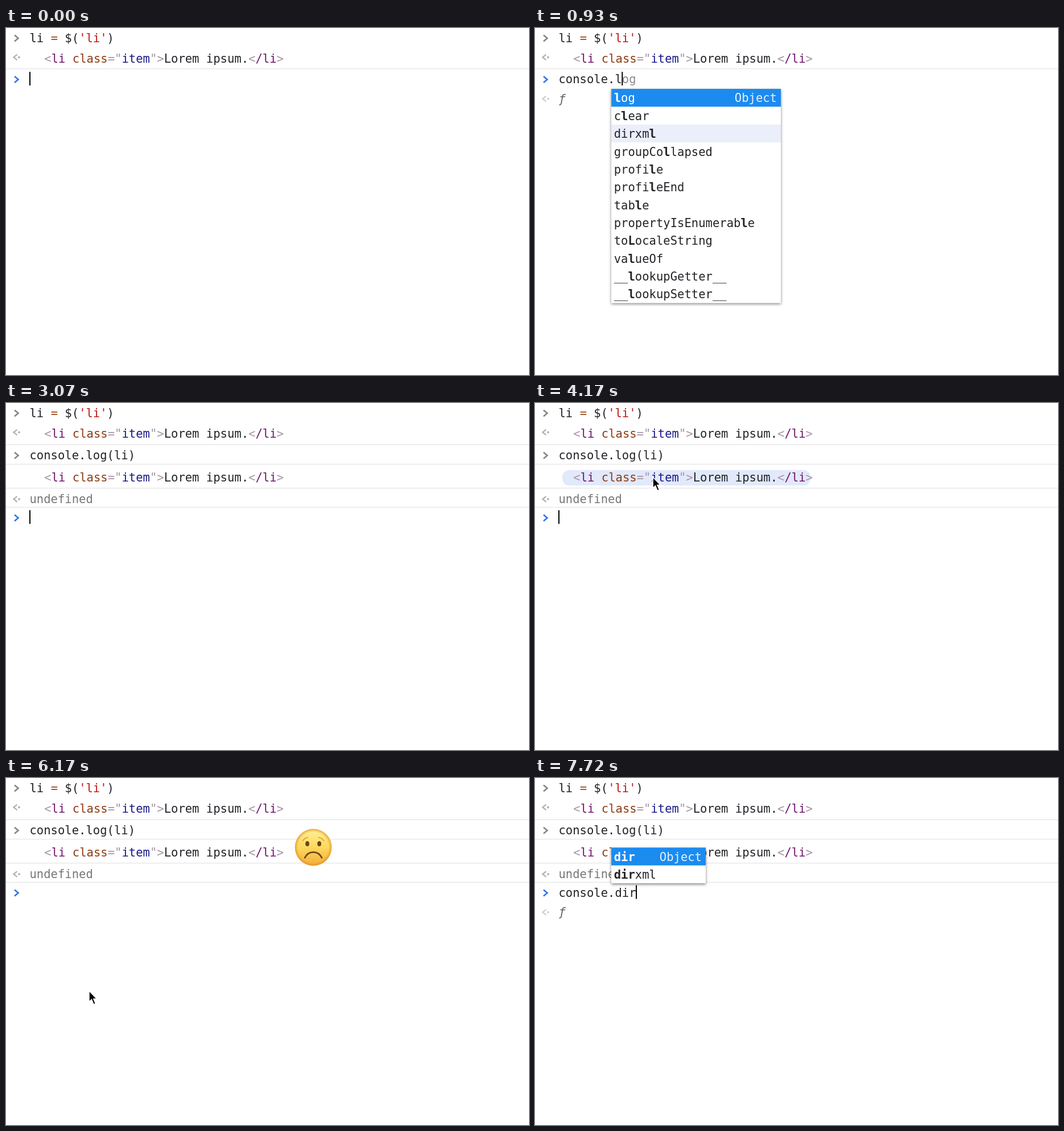
Recreate the animation shown at these times as an HTML page. Size 919x610 px, loop 8000 ms.

```html
<!DOCTYPE html>
<html lang="en">
<head>
<meta charset="utf-8">
<title>Console</title>
<style>
html, body { margin: 0; width: 100%; height: 100%; overflow: hidden; background: #fff; }
svg { display: block; width: 919px; height: 610px; }
text { font: 20.55px "DejaVu Sans Mono", monospace; white-space: pre; }
.b { font-weight: bold; }
.i { font-style: italic; }
</style>
</head>
<body>
<svg viewBox="0 0 919 610">
  <defs>
    <linearGradient id="face" x1="0" y1="0" x2="0" y2="1">
      <stop offset="0" stop-color="#fff09a"/>
      <stop offset=".5" stop-color="#fdd95c"/>
      <stop offset="1" stop-color="#f3ac3a"/>
    </linearGradient>
    <radialGradient id="rim">
      <stop offset=".82" stop-color="#e89a28" stop-opacity="0"/>
      <stop offset="1" stop-color="#dd8f22" stop-opacity=".75"/>
    </radialGradient>
    <filter id="shadow" x="-10%" y="-20%" width="120%" height="150%">
      <feDropShadow dx="0" dy="2" stdDeviation="2.4" flood-color="#000" flood-opacity=".5"/>
    </filter>
  </defs>
  <g id="stage"></g>
</svg>
<script>
const LOOP = 8000, CW = 12.37, LEFT = 41.5, ROW = 31.35;
const INK = '#222428', GRAY = '#7c7c7c', PALE = '#a894a6', TAG = '#70146a', NAME = '#8c3c14';
const SENT = 2210, RETYPE = 6480;

const globals = ('clear console confirm copy length li caches close closed crypto chrome customElements ' +
  'LinearAccelerationSensor AbsoluteOrientationSensor ApplicationCacheErrorEvent PublicKeyCredential ' +
  'cancelAnimationFrame HTMLDivElement clearInterval RelativeOrientationSensor clientInformation ' +
  'DocumentTimeline MediaCapabilities cancelIdleCallback VisualViewport HTMLFieldSetElement ' +
  'HTMLDialogElement applicationCache HTMLLinkElement').split(' ');
const methods = ('assert clear context count countReset debug dir dirxml error group groupCollapsed ' +
  'groupEnd info log profile profileEnd table time timeEnd timeStamp trace warn constructor ' +
  'hasOwnProperty isPrototypeOf propertyIsEnumerable toLocaleString toString valueOf ' +
  '__defineGetter__ __defineSetter__ __lookupGetter__ __lookupSetter__').split(' ');

// time, typed text, right edge of the suggestions (0: none), preview, text after the caret
const steps = [
  [0, ''],
  [70, 'c', 530],
  [280, 'co', 530, 'obj'],
  [330, 'con', 202, 'obj'],
  [410, 'console', 0, 'obj'],
  [590, 'console.', 432],
  [850, 'console.l', 432, 'fn'],
  [970, 'console.lo', 432, 'fn'],
  [1000, 'console.log', 300, 'fn'],
  [1030, 'console.log', 0, 'fn'],
  [1310, 'console.log(', 0, 'hint', ')'],
  [1550, 'console.log(l', 680, '', ')'],
  [1660, 'console.log(li', 580, '', ')'],
  [1970, 'console.log(li)'],
  [SENT, ''],
  [RETYPE, 'c', 530],
  [6600, 'co', 530, 'obj'],
  [6710, 'con', 288, 'obj'],
  [6800, 'cons', 288, 'obj'],
  [6870, 'conso', 288, 'obj'],
  [6970, 'console', 0, 'obj'],
  [7180, 'console.', 432],
  [7430, 'console.d', 432, 'fn'],
  [7560, 'console.di', 300, 'fn'],
  [7660, 'console.dir', 300, 'fn']
];

const esc = s => s.replace(/&/g, '&amp;').replace(/</g, '&lt;');
const span = (s, fill, cls = '') => `<tspan fill="${fill}" class="${cls}">${esc(s)}</tspan>`;
const text = (x, mid, spans, attrs = '') => `<text x="${x}" y="${mid + 7.2}" ${attrs}>${spans}</text>`;
const rect = (x, y, w, h, fill, attrs = '') =>
  `<rect x="${x}" y="${y}" width="${w}" height="${h}" fill="${fill}" ${attrs}/>`;
const line = y => rect(0, y - .75, 919, 1.5, '#e9e9e9');
const stroke = (d, color, w) => `<path d="${d}" fill="none" stroke="${color}" stroke-width="${w}"/>`;
const chevron = (y, color) => stroke(`M15 ${y - 5.5}l6.5 5.5l-6.5 5.5`, color, 2.6);
const reply = (y, color) =>
  stroke(`M19.5 ${y - 4.8}l-6 4.8l6 4.8`, color, 2.3) + `<circle cx="23" cy="${y}" r="1.9" fill="${color}"/>`;

const clamp = v => Math.max(0, Math.min(1, v));
const part = (t, from, to) => clamp((t - from) / (to - from));
const smooth = u => u * u * (3 - 2 * u);
const lerp = (a, b, u) => a + (b - a) * u;

const element = mid => text(67.3, mid,
  span('<', PALE) + span('li', TAG) + span(' class', NAME) + span('="', PALE) + span('item', '#1a1a8c') +
  span('">', PALE) + span('Lorem ipsum.', INK) + span('<', PALE) + span('/li', TAG) + span('>', PALE));

const command = text(LEFT, 18, span('li ', INK) + span('=', '#9a4a1c') + span(' $(', INK) +
  span("'li'", '#c01a16') + span(')', INK));

function preview(kind, mid) {
  if (kind !== 'obj' && kind !== 'fn') return '';
  const fn = span('ƒ', '#626262', 'i');
  const body = kind === 'fn' ? fn : span('console {', GRAY) +
    ['debug', 'error', 'info', 'log', 'warn'].map(k => span(k + ': ', '#8a8a8a') + fn + span(', ', GRAY)).join('') +
    span('…}', GRAY);
  return reply(mid, '#cfcfcf') + text(LEFT, mid, body);
}

function fuzzy(word, query) {
  let i = 0;
  for (const c of word.toLowerCase()) if (c === query[i]) i++;
  return i === query.length;
}

function suggest(typed, query, withHistory) {
  const words = typed.includes('.') && !typed.includes('(') ? methods : globals;
  const starts = words.filter(w => w.startsWith(query));
  if (!query) return starts;
  const list = query.length > 2 ? starts : starts.concat(words.filter(w => !starts.includes(w) && fuzzy(w, query)));
  if (words === globals && query.startsWith('co')) {
    list.sort((a, b) => (b === 'console') - (a === 'console'));
    if (withHistory) list.splice(1, query.length > 2 ? list.length : 0, '>console.log(li)');
  }
  return list;
}

function matched(word, query, fill) {
  let i = 0;
  return [...word].map(c => {
    const hit = i < query.length && c.toLowerCase() === query[i];
    if (hit) i++;
    return span(c, fill, hit ? 'b' : '');
  }).join('');
}

function popup(list, query, x, right, mid, hoverY, title) {
  const h = list.length * ROW;
  const top = h < mid - 16 ? mid - 16.5 - h : mid + 17;
  let out = rect(x, top, right - x, Math.min(h, 640), '#fff', 'filter="url(#shadow)"');
  list.forEach((word, i) => {
    const y = top + i * ROW, row = y + ROW / 2 + .6;
    if (y > 610) return;
    const on = i === 0 && query;
    if (on) out += rect(x, y, right - x, ROW, '#1b8bf0');
    else if (hoverY >= y && hoverY < y + ROW) out += rect(x, y, right - x, ROW, '#ebeefb');
    const past = word[0] === '>';
    if (past) out += stroke(`M${x + 9} ${row - 6}l7 5.5l-7 5.5`, '#3574e0', 2.6);
    out += text(x + (past ? 23 : 4.5), row, matched(past ? word.slice(1) : word, query, on ? '#fff' : INK));
    if (i === 0) out += text(right - 7, row, span(title, on ? '#e4f1ff' : GRAY), 'text-anchor="end"');
  });
  return out;
}

function prompt(t, mid) {
  const [, typed, right, kind, after = ''] = steps.filter(s => s[0] <= t).pop();
  const late = t >= SENT;
  const query = typed.match(/\w*$/)[0];
  const end = LEFT + typed.length * CW;
  const list = right ? suggest(typed, query, late) : [];
  const rest = query && list.length && list[0].startsWith(query) ? list[0].slice(query.length) : '';
  const idle = t >= SENT && t < RETYPE;
  const lit = !idle || t < 2620 || Math.floor((t - 2620) / 436) % 2 === 1;
  let out = chevron(mid + .5, '#3574e0') + preview(kind, mid + 34.5) +
    text(LEFT, mid, span(typed, INK) + span(rest, '#8c8c8c') + span(after, INK));
  if (right) {
    const title = typed.includes('.') && !typed.includes('(') ? 'Object' : 'Window';
    out += popup(list, query, end - query.length * CW - 6.3, right, mid, late ? 385 : 186, title);
  }
  if (kind === 'hint') {
    out += rect(228, 42, 94, 32, '#fff', 'filter="url(#shadow)"') + text(232, 58, span('...data', INK));
  }
  if (lit) out += rect(end - .5, mid - 13, 2, 24, '#000');
  return out;
}

function emoji(t) {
  if (t < 5800 || t > 7250) return '';
  const rise = 1 - Math.pow(1 - part(t, 5800, 6520), 3);
  const alpha = part(t, 5800, 6050) * (1 - part(t, 6970, 7250));
  return `<g transform="translate(540 ${lerp(160, 117, rise)})" opacity="${alpha}">
    <circle r="32.3" fill="url(#face)"/><circle r="32.3" fill="url(#rim)"/>
    <ellipse cx="-10.5" cy="-6.5" rx="3.4" ry="4.5" fill="#6b4418"/>
    <ellipse cx="10.5" cy="-6.5" rx="3.4" ry="4.5" fill="#6b4418"/>` +
    stroke('M-19 -11q4 -6 10 -6.5M19 -11q-4 -6 -10 -6.5', '#d9a23c', 1.6) +
    `<path d="M-15 18.5Q-10 8.5 0 8.5T15 18.5" fill="none" stroke="#6b4418" stroke-width="2.6" stroke-linecap="round"/></g>`;
}

function pointer(t) {
  if (t < 3660 || t >= RETYPE) return '';
  const near = smooth(part(t, 3660, 4850)), away = smooth(part(t, 5420, 6080));
  const x = lerp(lerp(290, 80, near), 146, away);
  const y = lerp(lerp(182, 124, smooth(part(t, 3660, 4300))), 374, away);
  const grow = part(t, 5270, 5600), shown = part(t, 5020, 5120) * (1 - grow);
  const ring = shown > 0 ? `<circle cx="85" cy="128" r="${29 + 22 * grow}" fill="none" stroke="#cf453f"
    stroke-width="${6 - 2 * grow}" opacity="${.9 * shown}"/>` : '';
  const hover = y > 113 && y < 148 ? rect(48, 118, 436, 27, '#e2e9fb', 'rx="12"') : '';
  const arrow = `<path transform="translate(${x} ${y})" d="M0 0V19.5L4.4 15.4L8 24L11.4 22.6L7.8 14.2H13.5Z"
    fill="#000" stroke="#fff" stroke-width="1.5"/>`;
  return { hover, over: ring + arrow };
}

function draw(t) {
  const sent = t >= SENT, mouse = pointer(t);
  let out = chevron(18, '#858585') + command + reply(51.5, '#b2b2b2') + element(54);
  if (sent) {
    out += [73.3, 107.6, 149.6, 183.4].map(line).join('') + (mouse.hover || '') +
      chevron(92.3, '#858585') + text(LEFT, 92, span('console.log(li)', INK)) + element(131) +
      reply(169, '#b2b2b2') + text(LEFT, 168.5, span('undefined', '#777'));
  } else {
    out += line(71.6);
  }
  return out + emoji(t) + prompt(t, sent ? 201.5 : 90) + (mouse.over || '');
}

const stage = document.getElementById('stage');
let last = '';
function tick(now) {
  const markup = draw(now % LOOP);
  if (markup !== last) stage.innerHTML = last = markup;
  requestAnimationFrame(tick);
}
tick(0);
</script>
</body>
</html>
```
